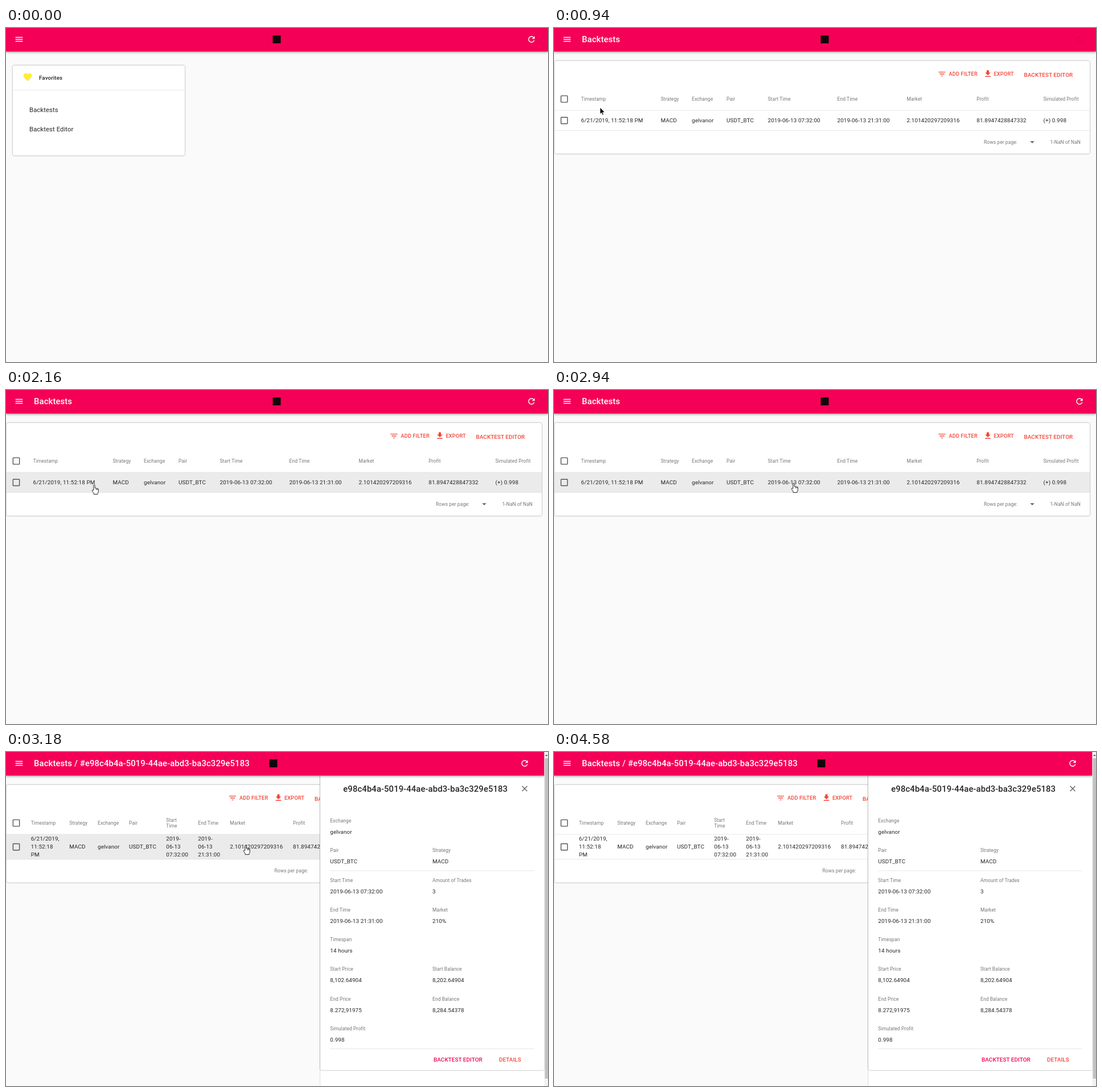
These frames come from a looping animation (952x588 px, 5340 ms). An HTML page:

```html
<!DOCTYPE html>
<html lang="en">
<head>
<meta charset="utf-8">
<title>Backtests</title>
<style>
  html, body { margin: 0; width: 100%; height: 100%; overflow: hidden; background: #fafafa; }
  svg { display: block; width: 100vw; height: 100vh; font-family: Roboto, Arial, sans-serif; }
  text { white-space: pre; }
  .card { fill: #fff; filter: drop-shadow(0 .8px .8px rgba(0,0,0,.32)) drop-shadow(0 0 1px rgba(0,0,0,.14)); }
  .bar { fill: #f50057; filter: drop-shadow(0 1.5px 2px rgba(0,0,0,.42)); }
  .line { fill: #e0e0e0; }
  .hover { fill: #ebebeb; }
</style>
</head>
<body>
<svg id="stage" viewBox="0 0 952 588"></svg>
<script>
const LOOP = 5340;
const PINK = '#f50057', RED = '#f44336', INK = '#262626', GREY = '#777';

const ICONS = {
  menu: 'M3 18h18v-2H3v2zm0-5h18v-2H3v2zm0-7v2h18V6H3z',
  refresh: 'M17.65 6.35C16.2 4.9 14.21 4 12 4c-4.42 0-7.99 3.58-7.99 8s3.57 8 7.99 8c3.73 0 6.84-2.55 7.73-6h-2.08c-.82 2.33-3.04 4-5.65 4-3.31 0-6-2.69-6-6s2.69-6 6-6c1.66 0 3.14.69 4.22 1.78L13 11h7V4z',
  close: 'M19 6.41L17.59 5 12 10.59 6.41 5 5 6.41 10.59 12 5 17.59 6.41 19 12 13.41 17.59 19 19 17.59 13.41 12z',
  filter: 'M10 18h4v-2h-4v2zM3 6v2h18V6H3zm3 7h12v-2H6v2z',
  save: 'M19 9h-4V3H9v6H5l7 7 7-7zM5 18v2h14v-2H5z',
  heart: 'M12 21.35l-1.45-1.32C5.4 15.36 2 12.28 2 8.5 2 5.42 4.42 3 7.5 3c1.74 0 3.41.81 4.5 2.09C13.09 3.81 14.76 3 16.5 3 19.58 3 22 5.42 22 8.5c0 3.78-3.4 6.86-8.55 11.54z',
  box: 'M19 5v14H5V5h14m0-2H5c-1.1 0-2 .9-2 2v14c0 1.1.9 2 2 2h14c1.1 0 2-.9 2-2V5c0-1.1-.9-2-2-2z',
  drop: 'M7 10l5 5 5-5z'
};

// Text placed by its left edge and the middle of its capitals
const text = (x, y, str, size, fill, weight = 400, gap = .0107) =>
  `<text x="${x}" y="${(y + size * .355).toFixed(2)}" font-size="${size}" fill="${fill}" ` +
  `font-weight="${weight}" letter-spacing="${(size * gap).toFixed(3)}">${str}</text>`;
const label = (x, y, str) => text(x, y, str, 8.46, GREY);
const value = (x, y, str) => text(x, y, str, 9.87, INK);
const title = (x, y, str, fill) => text(x, y, str, 14.85, fill, 500, .0075);
const button = (x, y, str, fill, size = 9.87, gap = .009) => text(x, y, str, size, fill, 500, gap);
const rect = (x, y, w, h, attrs) => `<rect x="${x}" y="${y}" width="${w}" height="${h}" ${attrs}/>`;
const rule = (x, y, w) => rect(x, y - .4, w, .8, 'class="line"');
const icon = (name, x, y, fill, scale = .705) =>
  `<path d="${ICONS[name]}" fill="${fill}" transform="translate(${x} ${y}) scale(${scale}) translate(-12 -12)"/>`;
const group = (id, body) => `<g id="${id}">${body}</g>`;

function appBar(id, width, name, logoX, refreshX) {
  return group(id,
    rect(0, -6, width, 47.5, 'class="bar"') +
    icon('menu', 23, 20, '#fff') +
    title(49, 20, name, '#fff') +
    rect(logoX - 7, 13, 14, 14, 'fill="#14060b"') +
    group(id + 'Refresh', icon('refresh', refreshX, 20, '#fff')));
}

function toolbar(shift) {
  return icon('filter', 681.5 - shift, 81, RED, .67) +
    button(693.5 - shift, 81, 'ADD FILTER', RED, 9.16, .02) +
    icon('save', 762 - shift, 80.5, RED, .68) +
    button(772.5 - shift, 81, 'EXPORT', RED, 9.16, .02) +
    button(825.5 - shift, 82, 'BACKTEST EDITOR', RED);
}

const pager = (shift, y) =>
  label(755 - shift, y, 'Rows per page:') +
  icon('drop', 840 - shift, y, '#666', .75) +
  label(871.5 - shift, y, '1-NaN of NaN');

// Cells are [x, heading, content]; a "|" breaks the line
function table(id, cells, width, bottom, shift) {
  const mid = (145 + bottom) / 2;
  const lines = (draw, x, y, str, step) => {
    const parts = str.split('|');
    return parts.map((p, i) => draw(x, y + (i - (parts.length - 1) / 2) * step, p)).join('');
  };
  return rect(1, 58, width, bottom + 41 - 58, 'rx="3" class="card"') +
    rect(1, 145, width, bottom - 145, `id="${id}Hover" class="hover"`) +
    rule(1, 145, width) + rule(1, bottom, width) +
    toolbar(shift) +
    icon('box', 18, 125, '#555') + icon('box', 18, mid + .2, '#555') +
    cells.map(([x, head, body]) =>
      lines(label, x, 125, head, 10.4) + lines(value, x, mid - .3, body, 14.3)).join('') +
    pager(shift, bottom + 20.5);
}

const ID = 'e98c4b4a-5019-44ae-abd3-ba3c329e5183';
const MARKET = '2.101420297209316', PROFIT = '81.8947428847332';

const home = group('home',
  rect(12, 66, 302, 158.5, 'rx="3" class="card"') +
  icon('heart', 38, 86.4, '#ffeb3b', .75) +
  text(58, 87, 'Favorites', 9.87, INK, 500, .007) +
  rule(12, 109.3, 302) +
  rect(30, 127, 266, 34, 'id="item0" class="hover"') +
  rect(30, 161, 266, 34, 'id="item1" class="hover"') +
  text(41, 144, 'Backtests', 11.28, INK, 400, .0094) +
  text(41, 178.4, 'Backtest Editor', 11.28, INK, 400, .0094) +
  appBar('homeBar', 952, '', 475.5, 923));

const list = group('list',
  table('wide', [
    [47.5, 'Timestamp', '6/21/2019, 11:52:18 PM'],
    [187.5, 'Strategy', 'MACD'],
    [242, 'Exchange', 'gelvanor'],
    [303, 'Pair', 'USDT_BTC'],
    [375.5, 'Start Time', '2019-06-13 07:32:00'],
    [497.5, 'End Time', '2019-06-13 21:31:00'],
    [619.5, 'Market', MARKET],
    [742.3, 'Profit', PROFIT],
    [859.5, 'Simulated Profit', '(+) 0.998']
  ], 940, 180.3, 0) +
  appBar('listBar', 952, 'Backtests', 475.5, 923) +
  `<circle id="spinner" cx="924" cy="20" r="4.6" fill="none" stroke="#d3004b" stroke-width="1.1" stroke-dasharray="20 9"/>`);

const fields = [
  [569.3, 121, 'Exchange', 'gelvanor'],
  [569.3, 172.7, 'Pair', 'USDT_BTC'], [749, 172.7, 'Strategy', 'MACD'],
  [569.3, 226, 'Start Time', '2019-06-13 07:32:00'], [749, 226, 'Amount of Trades', '3'],
  [569.3, 278.3, 'End Time', '2019-06-13 21:31:00'], [749, 278.3, 'Market', '210%'],
  [569.3, 330.4, 'Timespan', '14 hours'],
  [569.3, 382.3, 'Start Price', '8,102.64904'], [749, 382.3, 'Start Balance', '8,202.64904'],
  [569.3, 434.7, 'End Price', '8.272,91975'], [749, 434.7, 'End Balance', '8,284.54378'],
  [569.3, 486.7, 'Simulated Profit', '0.998']
];

const panel = group('panel',
  rect(551.5, 41, 394, 547, 'fill="#fff"') +
  rect(551.3, 41, .8, 547, 'fill="#d4d4d4"') +
  rect(552, 30, 393.3, 530, 'rx="3" class="card"') +
  title(592.3, 64.5, ID, INK) +
  icon('close', 911, 64.5, '#666') +
  fields.map(([x, y, name, val]) => label(x, y, name) + value(x, y + 19.4, val)).join('') +
  rule(569.3, 209, 358.5) + rule(569.3, 522.3, 358.5) +
  button(751, 541.7, 'BACKTEST EDITOR', PINK) +
  button(866, 541.7, 'DETAILS', RED));

const detail = group('detail',
  table('slim', [
    [43.7, 'Timestamp', '6/21/2019,|11:52:18|PM'],
    [111.3, 'Strategy', 'MACD'],
    [161, 'Exchange', 'gelvanor'],
    [216, 'Pair', 'USDT_BTC'],
    [281.3, 'Start|Time', '2019-|06-13|07:32:00'],
    [337.3, 'End Time', '2019-|06-13|21:31:00'],
    [393.3, 'Market', MARKET],
    [504, 'Profit', PROFIT]
  ], 657, 188.8, 283.5) +
  panel +
  appBar('detailBar', 945.5, 'Backtests / #' + ID, 469.5, 911) +
  rect(945.5, 0, 6.5, 588, 'fill="#f1f1f1"') +
  rect(946.5, 11, 5.5, 564, 'fill="#c1c1c1"') +
  '<path d="M947 7h4.6l-2.3-2.6z" fill="#505050"/>');

const cursor = group('cursor',
  '<path id="arrow" d="M0 0V11.5L2.6 9.1 4.4 13.2 6.2 12.4 4.4 8.4H8Z" fill="#000" stroke="#fff" stroke-width=".6"/>' +
  '<path id="hand" d="M-1.2 9.5V1.2a1.2 1.2 0 0 1 2.4 0V6q1.2-1 2.3.2 1.3-.7 2.2.5 1.6-.3 1.6 1.2V12q0 1.8-1.3 3V16.5H-.8V15L-3.6 10.6q-.7-1.6.8-1.6zM3.5 6.3V9M5.7 6.8V9" fill="#fff" stroke="#111" stroke-width=".9" stroke-linejoin="round"/>');

document.getElementById('stage').innerHTML =
  rect(0, 0, 952, 588, 'fill="#fafafa"') + home + list + detail + cursor;

const el = {};
document.querySelectorAll('[id]').forEach(e => el[e.id] = e);
const show = (id, on) => el[id].setAttribute('visibility', on ? 'inherit' : 'hidden');

const BURSTS = [
  [70, 530, 7], [680, 680, 1], [850, 1230, 6], [1390, 1460, 2], [1860, 2010, 3],
  [2160, 2620, 7], [2700, 2700, 1], [2870, 3340, 7], [3410, 3720, 5], [3870, 4350, 7], [4420, 4580, 3]
];
const ticks = [0];
for (const [from, to, n] of BURSTS)
  for (let i = 0; i < n; i++)
    ticks.push(Math.floor((from + (to - from) * i / Math.max(1, n - 1)) / 10) * 10);

// Pointer path: time, x, y
const PATH = [
  [0, 847, 610], [70, 847, 575], [530, 76, 130], [680, 81, 140], [1230, 81, 140],
  [1390, 84, 148], [1460, 87, 155], [1860, 92, 158], [2010, 103, 163], [2160, 155, 167],
  [2400, 300, 170], [2620, 413, 166], [2700, 421, 164], [3340, 421, 164], [3410, 455, 176],
  [3720, 812, 299], [3870, 820, 316], [3950, 841, 345], [4350, 871, 524], [4420, 878, 545],
  [4500, 890, 572], [4580, 898, 610]
];
function pointer(t) {
  const i = PATH.findIndex(k => k[0] > t);
  if (i < 0) return PATH[PATH.length - 1].slice(1);
  const a = PATH[i - 1], b = PATH[i], p = (t - a[0]) / (b[0] - a[0]);
  return [a[1] + (b[1] - a[1]) * p, a[2] + (b[2] - a[2]) * p];
}

function draw(time) {
  const t = ticks.filter(k => k <= time).pop();
  const scene = t < 850 ? 'home' : t < 3020 ? 'list' : 'detail';
  for (const id of ['home', 'list', 'detail']) show(id, id === scene);

  const [x, y] = pointer(t);
  const over = (name, x0, y0, x1, y1) => {
    const on = scene === name && x > x0 && x < x1 && y > y0 && y < y1;
    return on;
  };
  const hovers = {
    item0: over('home', 30, 127, 296, 161),
    item1: over('home', 30, 161, 296, 195),
    wideHover: over('list', 1, 145, 941, 180),
    slimHover: over('detail', 1, 145, 552, 188.8)
  };
  for (const id in hovers) show(id, hovers[id]);
  const pointing = Object.values(hovers).includes(true);
  show('arrow', !pointing);
  show('hand', pointing);
  el.cursor.setAttribute('transform', `translate(${x.toFixed(1)} ${y.toFixed(1)})`);

  const loading = t < 1230;
  show('spinner', loading);
  show('listBarRefresh', !loading);
  el.spinner.setAttribute('transform', `rotate(${(t - 940) * .26 + 30} 924 20)`);

  const p = Math.min(1, Math.max(0, (t - 2940) / 240));
  el.panel.setAttribute('transform', `translate(${(394 * (1 - p) ** 3).toFixed(1)} 0)`);
}

const start = performance.now();
function frame() {
  draw((performance.now() - start) % LOOP);
  requestAnimationFrame(frame);
}
frame();
</script>
</body>
</html>
```
